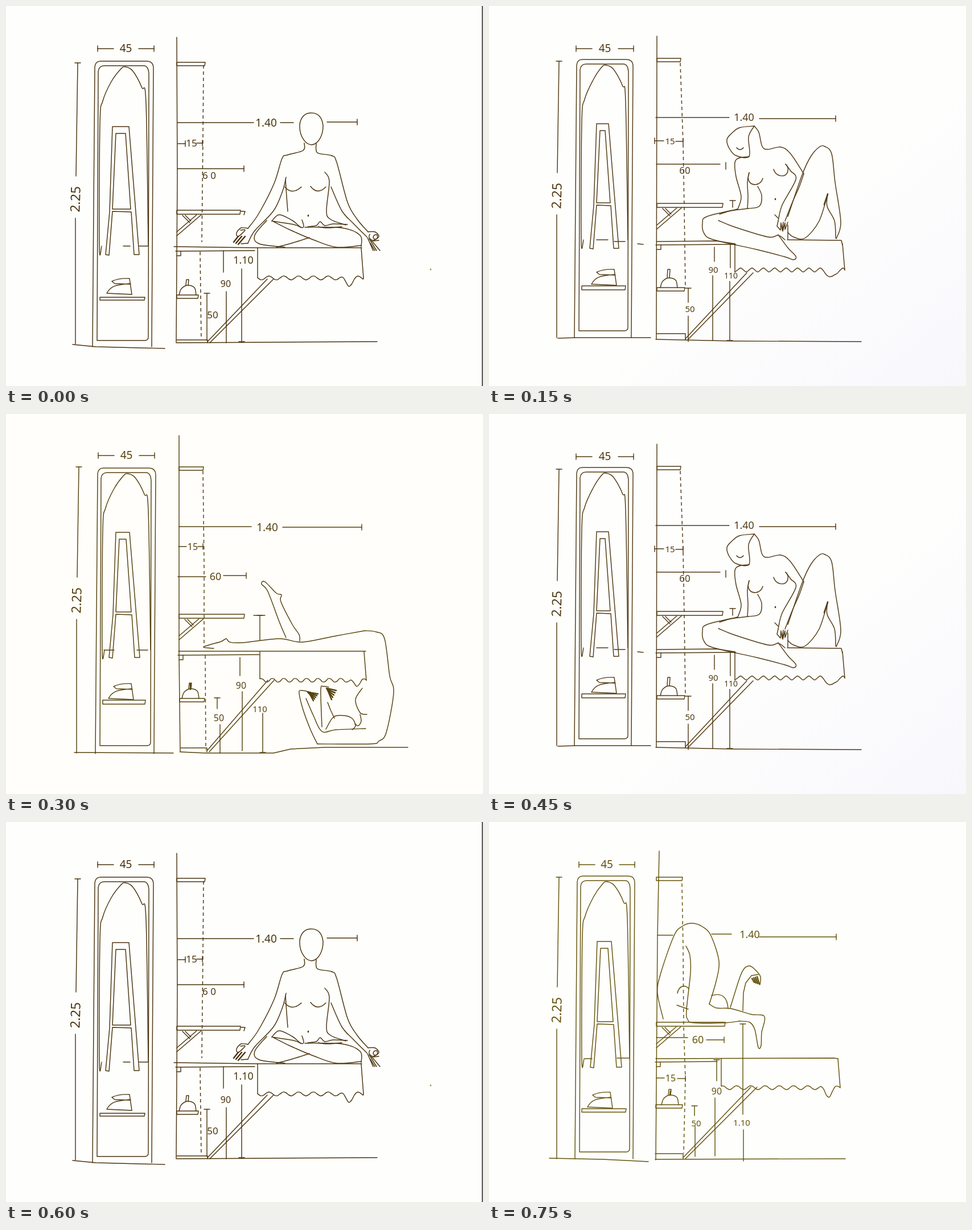
Recreate the animation shown at these times as an HTML page. Size 838 by 668 pixels, loop 0.9 s.

```html
<!DOCTYPE html>
<html lang="en">
<head>
<meta charset="utf-8">
<title>Folding table sketches</title>
<style>
html, body { margin: 0; width: 100%; height: 100%; overflow: hidden; background: #fefefe; }
svg { display: block; width: 100vw; height: 100vh; }
path { fill: none; stroke: currentColor; stroke-width: 1.45; stroke-linecap: round; stroke-linejoin: round; }
.dash { stroke-dasharray: 6 5; stroke-linecap: butt; }
.bold { stroke-width: 2.5; }
text { fill: currentColor; font-family: "Noto Sans", "Open Sans", sans-serif; text-anchor: middle; }
</style>
</head>
<body>
<svg id="stage" viewBox="0 0 838 668" preserveAspectRatio="none">
  <defs>
    <linearGradient id="shade" x1="0" y1="0" x2="1" y2="1">
      <stop offset=".6" stop-color="#fefefd"/><stop offset="1" stop-color="#f8f7fc"/>
    </linearGradient>
  </defs>
</svg>
<script>
const stage = document.getElementById('stage');
let group;

function add(parent, name, attributes) {
  const node = document.createElementNS('http://www.w3.org/2000/svg', name);
  for (const key in attributes) node.setAttribute(key, attributes[key]);
  return parent.appendChild(node);
}

const pairs = flat => flat.flatMap((v, i) => i % 2 ? [] : [[v, flat[i + 1]]]);
const path = (d, style = '') => add(group, 'path', { d, class: style });
const line = (...flat) => path('M' + pairs(flat).join('L'));
const bold = (...flat) => path('M' + pairs(flat).join('L'), 'bold');
const dash = (...flat) => path('M' + pairs(flat).join('L'), 'dash');

// Catmull-Rom spline through the points, written as cubic segments.
function curve(...flat) {
  const points = pairs(flat);
  const at = i => points[Math.max(0, Math.min(points.length - 1, i))];
  let d = 'M' + points[0];
  for (let i = 0; i < points.length - 1; i++) {
    const [before, from, to, after] = [at(i - 1), at(i), at(i + 1), at(i + 2)];
    const start = from.map((v, k) => v + (to[k] - before[k]) / 6);
    const end = to.map((v, k) => v - (after[k] - from[k]) / 6);
    d += `C${start} ${end} ${to}`;
  }
  path(d);
}

function label(text, x, y, size = 17, turn = 0) {
  add(group, 'text', { x, y, 'font-size': size, transform: `rotate(${turn} ${x} ${y})` }).textContent = text;
}

// Measuring lines; ends names the ticked ends: "a" first, "b" second.
function across(y, x1, x2, ends = '') {
  line(x1, y, x2, y);
  for (const end of ends) path(`M${end === 'a' ? x1 : x2} ${y - 5}v10`);
}
function upright(x, y1, y2, ends = '') {
  line(x, y1, x, y2);
  for (const end of ends) path(`M${x - 5} ${end === 'a' ? y1 : y2}h10`);
}

function sizeMarks(left, right, y, top, floor, x, middle) {
  across(y, left, left + 28, 'a');
  across(y, right - 27, right, 'b');
  label('45', (left + right) / 2, y + 6, 19);
  line(x, top, x - 3, middle - 41);
  path(`M${x - 5} ${top}h10`);
  line(x - 4, middle + 33, x - 4, floor);
  label('2.25', x + 4, middle, 23, -88);
}

function cabinet(left, top, right, floor, low, hem) {
  path(`M${left - 4} ${floor}L${left} ${top + 10}q1 -10 10 -10H${right - 12}q12 0 12 12L${right - 3} ${floor}`);
  path(`M${left + 4} ${low}L${left + 6} ${top + 18}q1 -10 11 -10H${right - 17}q8 0 9 14L${right - 9} ${low - 6}q0 5 -5 6Z`);
  const middle = (left + right) / 2 + 2;
  curve(left + 12, hem, left + 8, hem, left + 9, top + 110, left + 14, top + 70, left + 29, top + 36,
    middle - 8, top + 14, middle, top + 10, middle + 13, top + 17, middle + 29, top + 46, right - 13, top + 75, right - 9, hem);
}

function stool(x, y, width, foot) {
  const right = x + width, bar = foot - 75;
  line(x, y, right, y, right + 18, foot, right + 9, foot, right + 4, bar, x, bar - 1, x - 6, foot + 1, x - 12, foot, x - 5, bar, x, y);
  path(`M${x + 6} ${y + 12}H${right - 6}L${right + 3} ${bar - 5}H${x}Z`);
}

const board = (x, y, width, height = 7) => path(`M${x} ${y}h${width}l-1 ${height}H${x}Z`);

function iron(x, y) {
  path(`M${x} ${y}c7 -13 16 -15 40 -17M${x} ${y}l44 2l-4 -28q-19 -1 -31 5l5 4l28 1`);
}

function wallUnit(wall, top, shelf, shelfWidth, fold, foldWidth, table, under) {
  board(wall, shelf, shelfWidth, 6);
  board(wall, fold, foldWidth, 7);
  line(wall, fold + 45, wall + 43, fold + 8);
  line(wall, fold + 38, wall + 35, fold + 8);
  line(wall + 10, fold + 9, wall + 23, fold + 22);
  line(wall + 15, fold + 9, wall + 25, fold + 19);
  line(wall - 2, table + 7, under, table + 6);
  path(`M${wall} ${table + 15}h7v-8`);
}

function lamp(wall, y, width, x, knob) {
  board(wall, y, width, 6);
  curve(x - 15, y, x - 11, y - 11, x, y - 17, x + 12, y - 13, x + 15, y);
  path(`M${x - 3} ${y - 17}l1 ${-knob}h4l-1 ${knob}`);
}

function strut(wall, foot, floor, x, y, base) {
  line(wall, floor - base, foot, floor - base, foot, floor);
  line(foot, floor - 2, x, y);
  line(foot + 4, floor, x + 11, y);
}

function cloth(left, right, table, low, period, crest, dip, depth) {
  const flat = [];
  for (let x = left; x <= right; x += 5) {
    const wave = -3.5 * Math.cos((x - crest) * 2 * Math.PI / period);
    flat.push(x, low + wave + depth * Math.exp(-(((x - dip) / 8) ** 2)));
  }
  line(left, table, left, flat[1]);
  curve(...flat, right, low);
  line(right, low, right - 4, table);
}

function lotus() {
  sizeMarks(161, 260, 75, 100, 594, 126, 340);
  cabinet(156, 97, 259, 599, 588, 422);
  across(422, 206, 218);
  across(422, 234, 249);
  stool(187, 212, 29, 437);
  iron(177, 505);
  board(165, 512, 79, 5);
  line(117, 595, 158, 599, 279, 602);

  line(300, 55, 301, 300, 299, 592);
  wallUnit(300, 55, 99, 50, 359, 112, 424, 437);
  line(295, 423, 440, 425, 625, 425);
  line(413, 361, 420, 361, 418, 367);
  lamp(300, 508, 38, 319, 10);
  strut(300, 354, 592, 459, 480, 5);
  line(300, 592, 480, 591, 652, 590);
  cloth(442, 628, 425, 478, 26, 514, 602, 12);
  dash(347, 104, 346, 230, 344, 415);
  dash(341, 432, 343, 585);

  across(205, 301, 435);
  across(205, 482, 505);
  across(204, 564, 617, 'b');
  across(242, 302, 315, 'b');
  across(241, 335, 345, 'b');
  across(286, 301, 418, 'b');
  upright(382, 430, 468);
  upright(387, 502, 592);
  upright(414, 462, 590, 'b');
  upright(353, 505, 588, 'a');
  label('1.40', 457, 212, 19);
  label('15', 326, 247);
  label('6 0', 357, 304);
  label('90', 386, 494, 16);
  label('1.10', 417, 453, 18);
  label('50', 363, 549);

  path('M537 188C522 187 515 201 516 214C517 231 527 244 537 244C549 243 557 227 557 211C556 197 549 188 537 188');
  curve(524, 241, 522, 254, 494, 262, 485, 268, 471, 312, 444, 365, 425, 391);
  curve(545, 242, 547, 258, 572, 263, 581, 275, 600, 345, 617, 375, 636, 397);
  curve(492, 301, 486, 325, 470, 360, 437, 395, 425, 417);
  curve(491, 305, 493, 335, 495, 361);
  path('M490 318Q502 333 519 318M535 317Q547 333 562 318');
  curve(560, 292, 568, 308, 563, 360, 570, 375, 597, 385);
  curve(571, 318, 590, 360, 610, 382, 634, 406);
  bold(531, 368, 531, 369);

  curve(467, 378, 480, 367, 503, 377, 518, 389, 523, 387, 520, 376);
  curve(467, 378, 480, 380, 505, 384, 518, 389);
  curve(530, 388, 545, 386, 552, 379, 560, 386, 575, 383, 600, 384);
  curve(548, 388, 565, 390, 590, 388);
  curve(458, 377, 437, 403, 445, 418, 490, 424);
  curve(470, 379, 500, 394, 540, 411, 580, 424, 624, 421);
  curve(533, 407, 505, 416, 475, 424);
  curve(525, 389, 590, 390, 622, 403, 624, 423);

  curve(425, 391, 413, 390, 405, 399, 408, 405, 420, 394, 412, 394);
  for (let finger = 0; finger < 3; finger++) {
    bold(408 + 6 * finger, 405, 400 + 4 * finger, 415 + 2 * finger);
    line(635 + 3 * finger, 407 + 2 * finger, 645 + 6 * finger, 430);
  }
  line(425, 417, 413, 418);
  curve(636, 397, 648, 397, 655, 405, 645, 412, 638, 407, 639, 401);
  path('M652 402c-8 -1 -9 8 -3 8q5 0 3 -8M655 412l-10 1M640 417l8 13');
  add(group, 'rect', { x: 836, width: 1.5, height: 668, fill: '#222' });
  add(group, 'circle', { cx: 746, cy: 463, r: 1.5, fill: '#a09a50' });
}

function seated() {
  sizeMarks(153, 254, 75, 97, 583, 123, 334);
  cabinet(154, 94, 253, 583, 571, 411);
  across(411, 189, 209);
  across(414, 220, 239);
  stool(189, 207, 21, 426);
  iron(180, 489);
  board(163, 492, 77);
  line(121, 584, 154, 583, 284, 583);
  line(261, 418, 271, 419);

  line(295, 53, 294, 585);
  wallUnit(295, 53, 92, 42, 347, 116, 413, 433);
  line(295, 414, 400, 413, 432, 418);
  lamp(295, 495, 49, 316, 15);
  strut(294, 345, 587, 453, 469, 11);
  line(293, 586, 430, 589, 654, 590);
  cloth(432, 625, 418, 464, 20, 502, 601, 15);
  line(524, 411, 619, 412, 621, 420);
  dash(336, 100, 341, 240, 343, 355, 345, 492);

  across(196, 293, 422);
  across(198, 475, 609, 'b');
  across(237, 291, 307, 'a');
  across(238, 328, 341, 'b');
  across(278, 294, 406);
  upright(416, 275, 287);
  upright(428, 342, 354, 'a');
  upright(396, 424, 449);
  upright(393, 474, 588);
  upright(424, 419, 460);
  upright(423, 484, 588, 'b');
  upright(350, 496, 521, 'a');
  upright(350, 545, 590);
  label('1.40', 448, 202, 18);
  label('15', 318, 243, 15);
  label('60', 344, 295);
  label('90', 394, 469, 15);
  label('110', 425, 479, 14);
  label('50', 353, 538, 15);

  curve(466, 211, 440, 214, 425, 225, 418, 235, 422, 250, 434, 263, 457, 264, 456, 230, 466, 211);
  curve(466, 211, 474, 222, 480, 247, 490, 252, 513, 248, 530, 260, 553, 295);
  path('M435 249q6 7 12 0');
  curve(457, 265, 440, 267, 432, 275, 434, 300, 443, 335, 437, 357);
  curve(457, 293, 454, 310, 455, 335, 454, 356);
  path('M457 293C452 307 459 314 468 314Q478 313 481 303M500 287C503 297 512 300 519 298C527 294 527 283 521 278');
  curve(472, 317, 479, 333, 475, 352, 455, 356);
  curve(521, 278, 530, 290, 539, 305, 515, 350, 508, 378);
  curve(553, 295, 545, 318, 533, 345, 520, 378);
  bold(503, 339, 503, 340);

  curve(525, 370, 550, 297, 565, 265, 580, 248, 590, 247, 602, 260, 608, 310, 618, 380, 610, 409);
  curve(595, 330, 594, 352, 607, 378, 609, 408);
  curve(525, 398, 535, 406, 555, 408, 580, 378, 595, 330);
  bold(595, 331, 589, 349);
  curve(437, 357, 383, 370, 375, 382, 378, 400, 395, 411, 470, 428, 520, 441, 535, 446, 539, 440, 525, 425, 508, 402);
  curve(455, 356, 425, 360, 405, 366);
  curve(403, 377, 430, 388, 490, 406, 508, 403, 520, 411);
  line(502, 367, 508, 373);
  line(525, 385, 525, 410);
  line(508, 378, 506, 387, 512, 394, 513, 381, 515, 394, 517, 380, 516, 396, 520, 381, 520, 393, 525, 380);
}

function bridge() {
  sizeMarks(162, 261, 73, 93, 596, 128, 328);
  cabinet(161, 95, 263, 597, 583, 415);
  across(415, 172, 190);
  across(415, 230, 249);
  stool(193, 208, 24, 428);
  iron(180, 500);
  board(170, 503, 75);
  line(120, 595, 294, 596);

  line(304, 38, 304, 420, 306, 594);
  wallUnit(304, 38, 93, 43, 352, 115, 417, 445);
  line(303, 417, 632, 417);
  lamp(305, 500, 44, 324, 10);
  bold(324, 484, 324, 474);
  strut(307, 353, 594, 460, 468, 7);
  line(306, 594, 350, 596, 470, 596, 500, 589, 560, 586, 706, 586);
  cloth(446, 633, 418, 468, 20, 488, 615, 8);
  dash(346, 100, 348, 260, 348, 405);
  dash(350, 424, 351, 590);

  across(198, 304, 431);
  across(199, 486, 625, 'b');
  across(233, 303, 317);
  across(233, 337, 346, 'b');
  across(286, 302, 351);
  across(284, 382, 422, 'b');
  upright(446, 354, 398, 'a');
  path('M435 354h20');
  upright(411, 428, 460);
  upright(415, 488, 592);
  upright(451, 526, 595, 'b');
  upright(371, 499, 518, 'a');
  upright(376, 546, 596);
  label('1.40', 459, 206, 19);
  label('15', 328, 239, 16);
  label('60', 368, 292, 18);
  label('90', 413, 483, 16);
  label('110', 446, 524, 15);
  label('50', 374, 540, 16);

  curve(492, 393, 480, 365, 460, 312, 449, 299, 455, 295, 475, 315, 484, 318, 483, 330, 503, 370, 515, 388, 516, 399);
  curve(365, 412, 347, 410, 360, 405, 378, 400, 387, 395, 393, 401, 415, 402, 480, 395, 520, 401, 580, 390, 630, 381);
  curve(630, 381, 650, 383, 665, 395, 674, 460, 681, 490, 668, 560, 655, 575, 640, 580, 547, 580);
  curve(547, 580, 535, 555, 522, 520, 515, 490, 520, 486, 535, 489);
  curve(527, 500, 540, 530, 555, 558, 580, 555, 632, 553);
  curve(555, 550, 553, 485, 558, 479, 567, 480);
  line(565, 507, 570, 520, 577, 535);
  curve(562, 554, 575, 533, 592, 530, 608, 535, 614, 548, 608, 555);
  curve(626, 482, 614, 502, 622, 525, 634, 528);
  curve(622, 528, 624, 540, 619, 548, 613, 545);
  for (let finger = 0; finger < 5; finger++) {
    bold(530 + finger, 489 + finger, 548 - 2 * finger, 492 + 3 * finger);
    bold(563 + finger, 482 + 2 * finger, 580 - 2 * finger, 486 + 4 * finger);
  }
}

function folded() {
  sizeMarks(158, 256, 75, 97, 592, 123, 331);
  cabinet(155, 95, 256, 592, 580, 416);
  across(416, 168, 181);
  across(415, 225, 246);
  stool(190, 210, 25, 431);
  iron(173, 501);
  board(163, 504, 78, 6);
  line(106, 591, 200, 593, 280, 597);

  line(299, 51, 296, 200, 293, 594);
  wallUnit(294, 51, 97, 46, 352, 121, 415, 401);
  line(293, 416, 606, 415, 613, 416);
  lamp(293, 497, 47, 318, 10);
  bold(318, 480, 319, 473);
  strut(292, 341, 592, 460, 466, 9);
  line(292, 593, 626, 592);
  cloth(408, 617, 416, 467, 25, 485, 596, 14);
  dash(339, 108, 341, 220, 342, 360, 345, 450, 342, 582);

  across(199, 296, 323);
  across(197, 391, 426);
  across(202, 475, 610, 'b');
  across(379, 294, 349);
  across(383, 382, 413, 'b');
  across(450, 294, 308);
  across(451, 331, 345, 'b');
  upright(400, 418, 455, 'a');
  upright(397, 485, 587);
  upright(446, 355, 514, 'a');
  upright(447, 541, 596);
  upright(361, 499, 516, 'a');
  upright(362, 535, 588);
  label('1.40', 458, 204, 18);
  label('15', 319, 456, 16);
  label('60', 367, 389, 18);
  label('90', 400, 479, 16);
  label('1.10', 444, 534, 15);
  label('50', 364, 535, 15);

  curve(306, 346, 296, 300, 302, 265, 325, 200, 340, 183, 357, 178, 375, 184, 390, 200, 404, 245, 399, 280, 387, 320);
  curve(387, 320, 400, 327, 425, 328, 460, 338, 484, 342, 479, 370, 478, 393, 473, 396, 467, 365, 458, 352, 440, 350);
  curve(440, 350, 415, 353, 360, 353, 349, 347, 347, 330, 354, 265, 353, 235, 346, 218);
  path('M331 301C333 290 342 284 351 293M330 322l20 7');
  path('M391 305Q418 297 420 328');
  curve(424, 326, 440, 275, 448, 258, 458, 253, 468, 260, 477, 272, 476, 286);
  line(446, 332, 447, 300, 451, 283, 461, 270, 473, 268);
  for (let finger = 0; finger < 4; finger++) {
    bold(462 + 3 * finger, 275 - finger, 466 + 3 * finger, 282 + finger);
  }
}

function scene(ink, paper, draw) {
  group = add(stage, 'g', { color: ink, visibility: 'hidden' });
  add(group, 'rect', { width: 838, height: 668, fill: paper });
  draw();
  return group;
}

const a = scene('#4b3510', '#fefefc', lotus);
const b = scene('#523b14', 'url(#shade)', seated);
const c = scene('#55430f', '#fffefa', bridge);
const d = scene('#65540c', '#fefefd', folded);
const order = [a, b, c, b, a, d];
const hold = 150;
const start = performance.now();
let shown;

function render() {
  const next = order[Math.floor((performance.now() - start) / hold) % order.length];
  if (next !== shown) {
    if (shown) shown.setAttribute('visibility', 'hidden');
    next.setAttribute('visibility', 'visible');
    shown = next;
  }
  requestAnimationFrame(render);
}
render();
</script>
</body>
</html>
```
